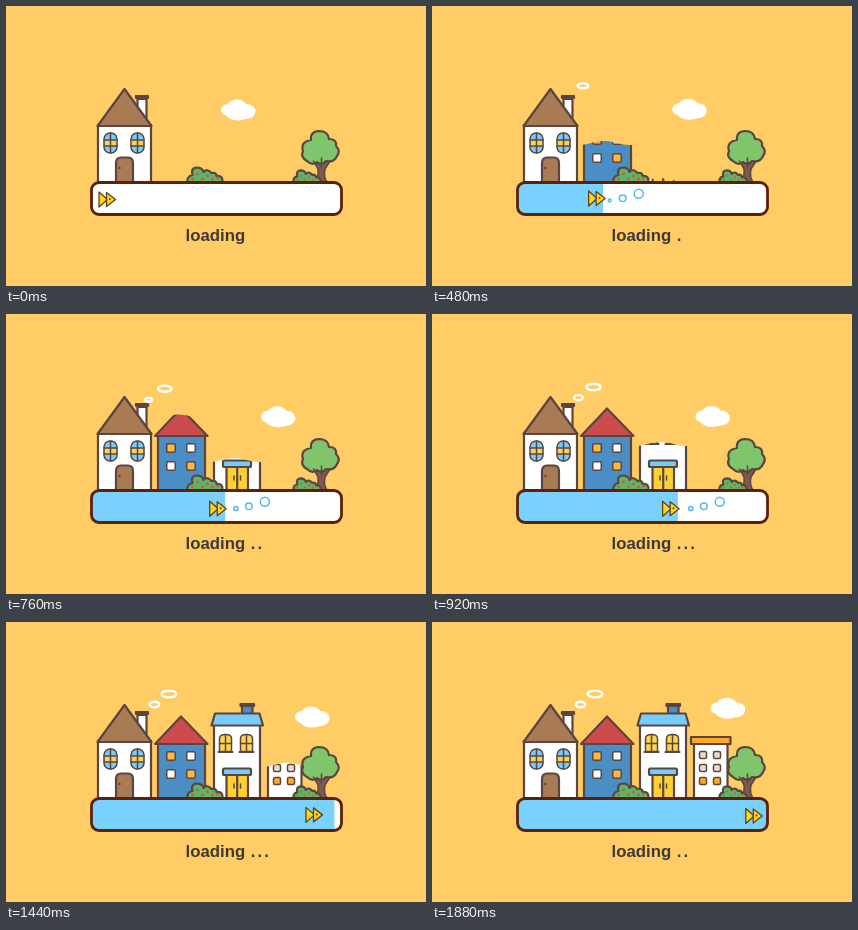
Animation of 420x280 px, one loop 1920 ms. Source, as an HTML page:

```html
<!DOCTYPE html>
<html lang="en">
<head>
<meta charset="utf-8">
<title>loading</title>
<style>
  html, body { margin: 0; width: 100%; height: 100%; overflow: hidden; background: #ffcc66; }
  svg { display: block; width: 100vw; height: 100vh; }
  text { font: bold 16.8px "Liberation Sans", Arial, sans-serif; fill: #3f3a38; }
  .line, .thin { stroke: #5a4540; stroke-linejoin: round; stroke-linecap: round; vector-effect: non-scaling-stroke; }
  .line { stroke-width: 2.2; }
  .thin { stroke-width: 1.5; }
  .ring { fill: none; stroke: #fff; stroke-width: 2.4; }
  .bubble { fill: none; stroke: #56b9ec; stroke-width: 1.5; }
</style>
</head>
<body>
<svg viewBox="0 0 420 280">
  <defs>
    <clipPath id="barClip"><rect x="86" y="177" width="249" height="31" rx="6.5"/></clipPath>
    <clipPath id="clip0"><path/></clipPath>
    <clipPath id="clip1"><path/></clipPath>
    <clipPath id="clip2"><path/></clipPath>
    <g id="archWindow">
      <rect x="-6.500" y="-10" width="13" height="20" rx="6" fill="#76cdfb"/>
      <path d="M-6 -3H6V3H-6Z" fill="#ffd04f"/>
      <rect class="thin" x="-6.500" y="-10" width="13" height="20" rx="6" fill="none"/>
      <path class="thin" d="M0 -10V10M-6.500 -3H6.500M-6.500 3H6.500"/>
    </g>
    <g id="paneWindow">
      <path class="thin" fill="#ffd44a" d="M-6 8V-5Q-6 -9 0 -9T6 -5V8Z"/>
      <path class="thin" d="M0 -9V8M-6 0H6"/>
      <path class="line" d="M-7 8.500H7"/>
    </g>
    <g id="bush">
      <path class="line" fill="#5db665" d="M0 0Q-1 -7 5 -8Q3 -15 9 -15.500Q15 -15.500 16 -11Q20 -15 24 -10Q29 -11 29 -7Q36 -8 35 0Z"/>
      <g id="berries" fill="#d6534b"></g>
    </g>
  </defs>

  <rect width="420" height="280" fill="#ffcc66"/>

  <g id="cloud" fill="#fff">
    <ellipse cx="-10" cy="0" rx="7" ry="6"/>
    <ellipse cx="-1" cy="-2" rx="10.500" ry="8.500"/>
    <ellipse cx="8.500" cy="1.500" rx="9" ry="7.500"/>
    <ellipse cx="0" cy="4" rx="12" ry="6.500"/>
  </g>
  <ellipse class="ring"/>
  <ellipse class="ring"/>

  <g class="line">
    <path fill="#fff" d="M131.500 93H140.500V120H131.500Z"/>
    <path fill="#7a5b50" d="M130 90H142V92H130Z"/>
    <path fill="#fff" d="M92 119H145V177H92Z"/>
    <path fill="#a87b54" d="M118.500 83L145.500 120H91.500Z"/>
    <path fill="#a87b54" d="M110 177V157Q110 151.500 115 151.500H122Q127 151.500 127 157V177Z"/>
  </g>
  <circle cx="113.500" cy="162" r="1.200" fill="#5a4540"/>
  <use href="#archWindow" x="104.500" y="137"/>
  <use href="#archWindow" x="131.500" y="137"/>

  <g clip-path="url(#clip0)">
    <path class="line" fill="#4b8dc5" d="M152 122H199V177H152Z"/>
    <path class="line" fill="#cc4c4d" d="M175 94.500L201.500 122H149Z"/>
    <g id="blueWindows"></g>
  </g>

  <g clip-path="url(#clip1)">
    <g class="line">
      <path fill="#4b8dc5" d="M236 84H246.500V92H236Z"/>
      <path fill="#4b8dc5" d="M234.500 82H248V84H234.500Z"/>
      <path fill="#fff" d="M208 103H254V177H208Z"/>
      <path fill="#76cdfb" d="M209 91.500H253.500L257 103.500H205.500Z"/>
      <path fill="#ffd02f" d="M220.500 153H242V177H220.500ZM231.200 153V177"/>
      <rect fill="#76cdfb" x="217" y="146.500" width="28" height="6.500" rx="1.500"/>
    </g>
    <path class="thin" d="M228 162V166M234.500 162V166"/>
    <use href="#paneWindow" x="219.500" y="121.500"/>
    <use href="#paneWindow" x="240.500" y="121.500"/>
  </g>

  <g clip-path="url(#clip2)">
    <path class="line" fill="#fff" d="M262 122H295.500V177H262Z"/>
    <path class="line" fill="#ffa928" d="M259 115H298.500V122H259Z"/>
    <g id="flatWindows"></g>
  </g>

  <path fill="#7c5a50" d="M308 177Q313 172 312 163L306 154L314 157L316 148L318.500 157L325 154L319 163Q317 172 322 177Z"/>
  <path class="line" fill="#80c56c" d="M305 134Q304 125.500 313 125Q322 125 323 133Q331 133 330 140Q335 145 331 150Q328 157 320 155Q316 160 311 156Q306 160 301 155Q294 151 297 145Q294 136 305 134Z"/>
  <path class="thin" fill="none" d="M308 177Q313 172 312 163L307.500 155M315.500 152V161M324 155L319 163Q317 172 322 177"/>

  <use href="#bush" x="181.500" y="177"/>
  <use href="#bush" transform="translate(287.500 177) scale(.77 .82)"/>

  <rect x="85.500" y="176.500" width="250" height="32" rx="7.500" fill="#fff"/>
  <g clip-path="url(#barClip)">
    <rect id="water" x="84" y="176" height="34" fill="#79d1ff"/>
    <circle class="bubble"/>
    <circle class="bubble"/>
    <circle class="bubble"/>
  </g>
  <g id="fish" stroke="#5b431d" stroke-width="1.300" stroke-linejoin="round" fill="#ffd51f">
    <path d="M1 -7.500L9.500 0L1 7.500Z"/>
    <path d="M8.500 -7L17.500 0L8.500 7Z"/>
    <circle cx="11.800" cy="-.500" r="1" fill="#5b431d" stroke="none"/>
  </g>
  <rect x="85.500" y="176.500" width="250" height="32" rx="7.500" fill="none" stroke="#5c2109" stroke-width="2.800"/>

  <text x="179.500" y="234.500">loading</text>
  <g id="dots"></g>
</svg>
<script>
const LOOP = 1920, STEP = 40;
const $ = id => document.getElementById(id);
const all = selector => [...document.querySelectorAll(selector)];
const clamp01 = v => Math.min(1, Math.max(0, v));
const show = (el, on) => el.setAttribute("visibility", on ? "visible" : "hidden");
const set = (el, attrs) => {
  for (const name in attrs) el.setAttribute(name, attrs[name]);
};

function addShape(parent, tag, attrs, text = "") {
  const el = document.createElementNS("http://www.w3.org/2000/svg", tag);
  set(el, attrs);
  el.textContent = text;
  $(parent).append(el);
}
function addWindow(parent, cx, cy, size, fill) {
  addShape(parent, "rect", {
    x: cx - size / 2, y: cy - size / 2, width: size, height: size,
    rx: 1.5, fill, class: "thin"
  });
}

for (let row = 0; row < 3; row++)
  for (let col = 0; col < 2; col++) {
    if (row < 2) addWindow("blueWindows", 165 + 20 * col, 134 + 18 * row, 8.5, row === col ? "#ffb840" : "#fff");
    addWindow("flatWindows", 271 + 14 * col, 133 + 13 * row, 7, row < 2 ? "#ecdccb" : "#ffa928");
  }
for (let i = 0; i < 6; i++)
  addShape("berries", "circle", { cx: 5 + 5 * i, cy: i % 2 ? -10 + i : -4, r: 1.4 });
for (let i = 0; i < 3; i++)
  addShape("dots", "text", { x: 244.7 + 6.8 * i, y: 234.5 }, ".");

// Straight runs between [time, x, y] points.
function along(points, t) {
  const i = Math.max(1, points.findIndex(p => p[0] > t));
  const [t0, x0, y0] = points[i - 1], [t1, x1, y1] = points[i];
  const k = (t - t0) / (t1 - t0);
  return [x0 + (x1 - x0) * k, y0 + (y1 - y0) * k];
}

const cloudPath = [[0, 232, 104], [1160, 293, 102], [1440, 306, 95], [1620, 307, 87], [LOOP, 294, 86]];
const fishPath = [[0, 92, 193.5], [280, 122, 193.5], [1160, 270, 193.5], [1440, 299, 193.5], [LOOP, 314, 194]];
const houses = [
  { left: 147, right: 204, birth: 130, speed: 0.123 },
  { left: 203, right: 260, birth: 420, speed: 0.1 },
  { left: 256, right: 301, birth: 1130, speed: 0.12 }
];
const smoke = [
  { birth: 160, life: 1000, dx: 26, dy: -17, rx: 7.4, ry: 3.4 },
  { birth: 600, life: 560, dx: 11.5, dy: -6.5, rx: 4.8, ry: 2.8 }
];
const rings = all(".ring"), bubbles = all(".bubble"), dots = all("#dots text");

// Everything below a rising, rounded crest.
function crestPath({ left, right, birth, speed }, t) {
  const y = 180 - speed * (t - birth);
  let d = `M${left} 190`;
  for (let x = left; x <= right; x += 2)
    d += `L${x} ${y + 2 * Math.cos((x - left) / 8)}`;
  return d + `L${right} 190Z`;
}

function draw(t) {
  const edge = 83 + 0.187 * t - 1.2e-5 * t * t;
  set($("water"), { width: edge - 84 + 1 });

  const [fishX, fishY] = along(fishPath, t);
  const bob = -2.5 * (1 - t / LOOP) * Math.sin(t / 185);
  set($("fish"), { transform: `translate(${fishX} ${fishY + bob})` });
  set($("cloud"), { transform: `translate(${along(cloudPath, t)})` });

  bubbles.forEach((bubble, i) => {
    const age = t - 400 + 150 * i;
    show(bubble, age >= 0);
    set(bubble, {
      cx: edge + 10 + 13 * i + 1.5 * i * (i - 1) + 0.014 * (t - 640),
      cy: 194.5 - i - 1.2 * i * i,
      r: (2.1 + 1.2 * i) * clamp01(0.4 + age / 300)
    });
  });

  smoke.forEach(({ birth, life, dx, dy, rx, ry }, i) => {
    const rise = 1 - (1 - clamp01((t - birth) / life)) ** 2;
    const size = Math.sqrt(rise);
    show(rings[i], t > birth);
    set(rings[i], { cx: 137 + dx * rise, cy: 89 + dy * rise, rx: rx * size, ry: ry * size });
  });

  houses.forEach((house, i) => set($("clip" + i).firstElementChild, { d: crestPath(house, t) }));

  const count = t < 400 ? 0 : Math.floor((t - 400) / 200) % 3 + 1;
  dots.forEach((dot, i) => show(dot, i < count));
}

const start = performance.now();
function tick() {
  const t = (performance.now() - start) % LOOP;
  draw(Math.floor(t / STEP) * STEP);
  requestAnimationFrame(tick);
}
tick();
</script>
</body>
</html>
```
